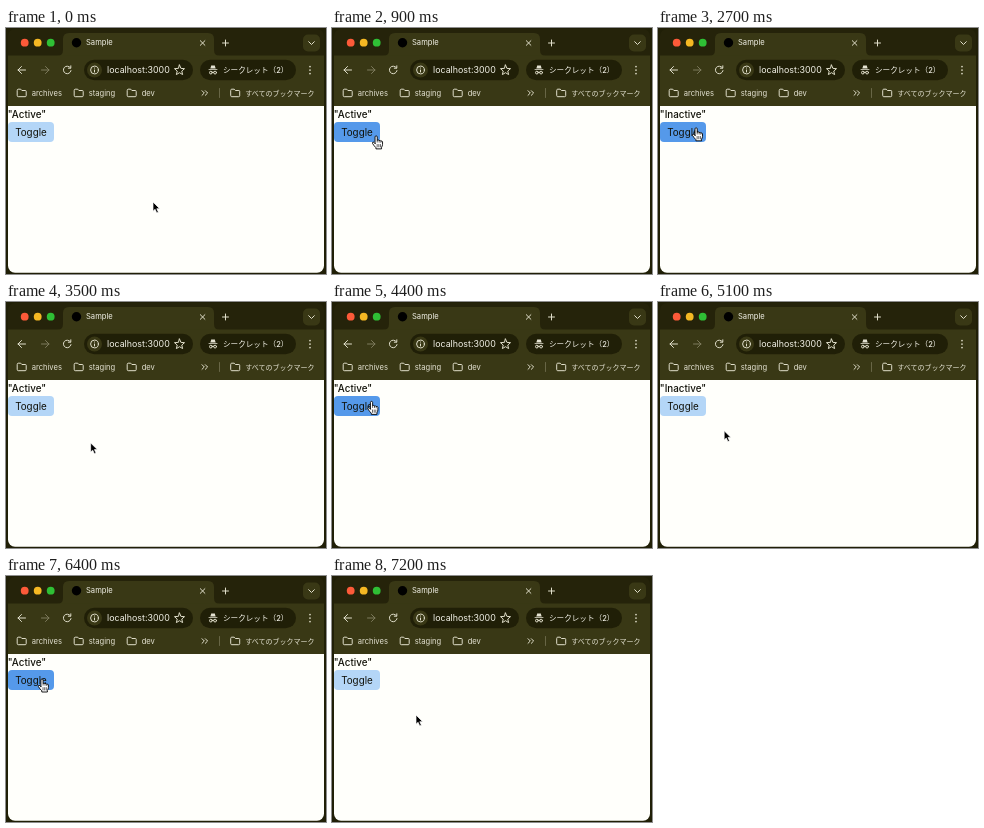
Animation of 320x246 px, one loop 7400 ms. Source, as an HTML page:

```html
<!DOCTYPE html>
<html lang="ja">
<head>
<meta charset="utf-8">
<title>Toggle demo</title>
<style>
html, body { margin: 0; width: 100%; height: 100%; overflow: hidden; background: #211f08; }
svg { display: block; width: 320px; height: 246px; }
text { font-family: Inter, "Noto Sans CJK JP", "Noto Sans CJK", sans-serif; fill: #f3f2e8; white-space: pre; }
.page { font-size: 9.8px; font-weight: 500; fill: #111108; }
.icon { fill: none; stroke: #e0deca; stroke-width: 1; stroke-linecap: round; stroke-linejoin: round; }
.dim { stroke: #7d7a5c; }
.mark { font-size: 7.6px; fill: #e4e2d2; }
.strip { fill: #25230a; }
.bar { fill: #393815; }
.pill { fill: #201f07; }
</style>
</head>
<body>
<svg viewBox="0 0 320 246">
  <defs>
    <clipPath id="frame"><rect x="2" y="1" width="316" height="243.7" rx="7"/></clipPath>
    <path id="folder" d="M.5 1.5 Q.5 .5 1.5 .5 H4 L5.2 1.8 H8.7 Q9.5 1.8 9.5 2.7 V7 Q9.5 8 8.5 8 H1.5 Q.5 8 .5 7 Z"/>
  </defs>
  <rect width="320" height="246" class="pill"/>
  <g clip-path="url(#frame)">
    <rect width="320" height="28" class="strip"/>
    <path class="bar" d="M51 28 Q57 28 57 22 V11 Q57 5 63 5 H202 Q208 5 208 11 V22 Q208 28 214 28 Z"/>
    <rect y="27.5" width="320" height="51" class="bar"/>
    <rect y="78" width="320" height="168" fill="#fffffb"/>
  </g>

  <g id="lights"></g>
  <circle cx="70.5" cy="14.8" r="4.7"/>
  <text x="80" y="17.4" font-size="7.6">Sample</text>
  <rect x="297" y="6.5" width="17" height="17" rx="5" class="bar"/>
  <g class="icon">
    <path d="M194.3 12.7 l4.6 4.6 m0 -4.6 l-4.6 4.6"/>
    <path d="M216.5 15 h6 m-3 -3 v6"/>
    <path d="M302.7 13.7 l2.8 2.8 l2.8 -2.8"/>
    <path d="M19.5 42 h-7.5 m3.5 -3.5 l-3.5 3.5 l3.5 3.5"/>
    <path class="dim" d="M35.5 42 h7.5 m-3.5 -3.5 l3.5 3.5 l-3.5 3.5"/>
    <path d="M64.4 39.8 A3.8 3.8 0 1 0 65 42.6 M64.8 37.8 v2.4 h-2.5"/>
  </g>

  <rect x="78" y="31.7" width="109" height="20.5" rx="10.2" class="pill"/>
  <circle cx="88.5" cy="42" r="7.5" class="bar"/>
  <g class="icon">
    <circle cx="88.5" cy="42" r="3.9"/>
    <path d="M88.5 42 v2 M88.5 40 v.1"/>
    <path id="star"/>
  </g>
  <text x="101" y="45.1" font-size="8.9">localhost:3000</text>

  <rect x="194" y="31.7" width="96" height="20.5" rx="10.2" class="pill"/>
  <path d="M204.3 40.6 l.9 -2.9 q.3 -.6 .9 -.3 l.9 .2 l.9 -.2 q.6 -.3 .9 .3 l.9 2.9 Z M202.6 41 h8.8 v.8 h-8.8 Z" fill="#e4e2d2"/>
  <g class="icon" stroke-width=".8">
    <circle cx="204.9" cy="44.6" r="1.4"/><circle cx="209.1" cy="44.6" r="1.4"/>
    <path d="M206.3 44.3 h1.4"/>
  </g>
  <text x="217" y="44.8" font-size="7.6" font-weight="500">シークレット（2）</text>
  <path class="icon" d="M304 38.5 v.1 M304 42 v.1 M304 45.5 v.1" style="stroke-width:1.7"/>

  <g id="bookmarks"></g>
  <g class="icon">
    <path d="M196 62.7 l2.3 2.3 l-2.3 2.3 m3.3 -4.6 l2.3 2.3 l-2.3 2.3"/>
    <path class="dim" d="M213.5 60.5 v9" stroke-width=".7"/>
  </g>

  <text class="page" id="label" x="1.8" y="90"></text>
  <rect id="button" x="2" y="94" width="46" height="20" rx="4"/>
  <text class="page" x="9.2" y="107.5" style="font-weight:400">Toggle</text>

  <path id="arrow" d="M0 0 V9.2 L2.1 7.3 L3.7 10.9 L5.4 10.2 L3.8 6.7 H6.7 Z" stroke="#fff" stroke-width=".7" stroke-linejoin="round"/>
  <g id="hand" stroke="#000" stroke-width=".9" stroke-linejoin="round" stroke-linecap="round">
    <path d="M-1.1 7.6 V1 Q-1 0 0 0 Q1 0 1.1 1 V4.4 Q2.2 3.5 3 4.7 Q4.1 4 4.7 5.2 Q6 4.6 6.4 6 V8.5 Q6.3 10.2 5.4 11.4 V13 H-.2 V11.8 Q-2 10.2 -3.6 7.6 Q-4 6.4 -3 6.2 Q-2.2 6.2 -1.1 7.6 Z" fill="#fff"/>
    <path d="M1.1 4.4 V6.2 M3 4.8 V6.3 M4.7 5.3 V6.5 M1 8.6 V11 M2.7 8.6 V11 M4.3 8.6 V11" fill="none" stroke-width=".6"/>
  </g>
</svg>
<script>
const LOOP = 7400, STEP = 100;
const el = id => document.getElementById(id);

const home = { x: 147, y: 174 };
// The pointer visits the button four times, resting after each move
const moves = [
  { from: 400, to: 1100, x: 35, y: 102 },
  { from: 1700, to: 2100, x: 112, y: 164 },
  { from: 2200, to: 2800, x: 36, y: 98 },
  { from: 3400, to: 3650, x: 112, y: 165 },
  { from: 3800, to: 4500, x: 38, y: 98 },
  { from: 4900, to: 5400, x: 82, y: 146 },
  { from: 5600, to: 6200, x: 36, y: 103 },
  { from: 6800, to: 7200, x: 84, y: 139 }
];
const clicks = [1400, 3200, 4800, 6400];

const easeOut = p => 1 - (1 - p) ** 2;
const clamp = p => Math.min(1, Math.max(0, p));

function pointerAt(t) {
  return moves.reduce((at, m) => {
    const p = easeOut(clamp((t - m.from) / (m.to - m.from)));
    return { x: at.x + (m.x - at.x) * p, y: at.y + (m.y - at.y) * p };
  }, home);
}

function starPath(cx, cy, r) {
  const points = Array.from({ length: 10 }, (_, i) => {
    const a = i * Math.PI / 5 - Math.PI / 2, d = i % 2 ? r * 0.45 : r;
    return `${cx + d * Math.cos(a)} ${cy + d * Math.sin(a)}`;
  });
  return `M${points.join("L")}Z`;
}

function bookmark(name, x, size = 7.6) {
  return `<use class="icon" href="#folder" x="${x}" y="60.7"/>` +
    `<text class="mark" x="${x + 15}" y="67.6" style="font-size:${size}px">${name}</text>`;
}

function build() {
  el("star").setAttribute("d", starPath(173.5, 42.3, 5.3));
  el("lights").innerHTML = ["#fd5a39", "#f5b823", "#2fbf35"]
    .map((c, i) => `<circle cx="${18.7 + 13 * i}" cy="14.7" r="3.9" fill="${c}"/>`).join("");
  el("bookmarks").innerHTML = bookmark("archives", 10.7) + bookmark("staging", 67.7) +
    bookmark("dev", 120.7) + bookmark("すべてのブックマーク", 224.2, 7);
}

function draw(ms) {
  const t = Math.floor(ms % LOOP / STEP) * STEP;
  const { x, y } = pointerAt(t);
  const over = x > 2 && x < 48 && y > 94 && y < 113.5;
  const active = clicks.filter(c => c <= t).length % 2 === 0;
  el("label").textContent = active ? '"Active"' : '"Inactive"';
  el("button").setAttribute("fill", over ? "#5599ea" : "#b4d6f7");
  el("arrow").style.display = over ? "none" : "";
  el("hand").style.display = over ? "" : "none";
  el(over ? "hand" : "arrow").setAttribute("transform", `translate(${x} ${y})`);
}

build();
const start = performance.now();
function tick() {
  draw(performance.now() - start);
  requestAnimationFrame(tick);
}
tick();
</script>
</body>
</html>
```
